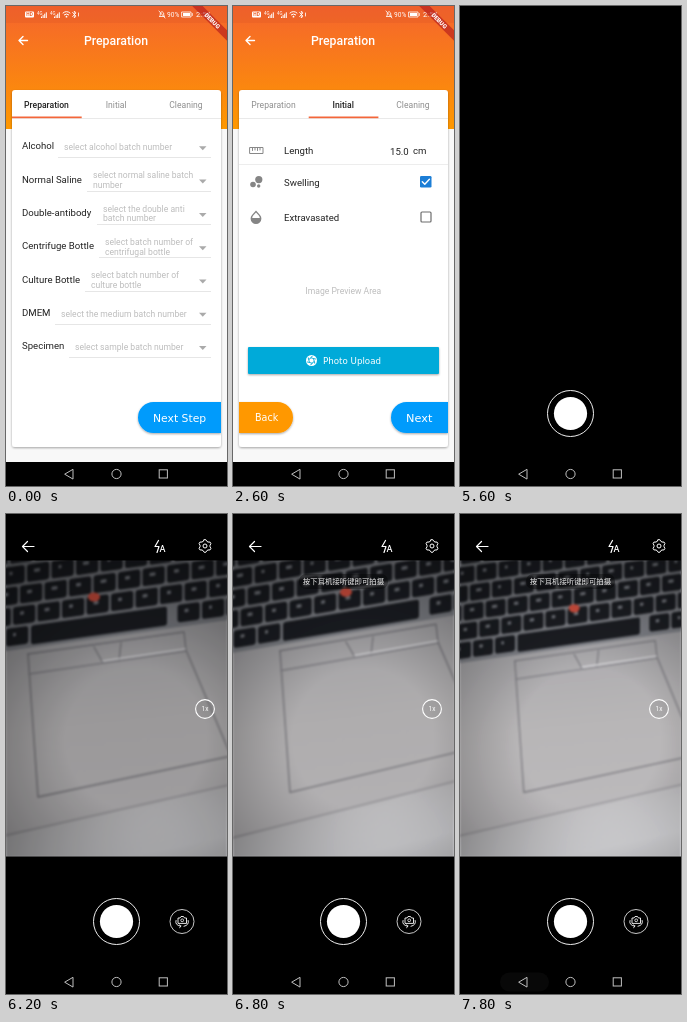
Recreate the animation shown at these times as an HTML page. Size 221 px wide and 480 px high, loop 8 s.

```html
<!DOCTYPE html>
<html lang="en">
<head>
<meta charset="utf-8">
<title>Preparation form</title>
<style>
  html, body { margin: 0; width: 100%; height: 100%; overflow: hidden; background: #000; }
  svg { display: block; width: 100vw; height: 100vh; }
  text { font-family: Roboto, sans-serif; font-size: 8.6px; }
  .label { font-size: 9.6px; fill: #222; }
  .hint { fill: #bdbdbd; }
  .script { font-family: "DejaVu Sans", sans-serif; fill: #fff; }
  .mid { text-anchor: middle; }
  .line { fill: none; stroke: #fff; stroke-linecap: round; stroke-linejoin: round; }
  .status { font-size: 6.6px; fill: #fff; }
</style>
</head>
<body>
<svg id="stage" viewBox="0 0 221 480" preserveAspectRatio="none"></svg>
<script>
const LOOP = 8000, STEP = 200;

const text = (x, y, s, cls = '', extra = '') => `<text x="${x}" y="${y}" class="${cls}" ${extra}>${s}</text>`;
const rect = (x, y, w, h, fill, extra = '') => `<rect x="${x}" y="${y}" width="${w}" height="${h}" fill="${fill}" ${extra}/>`;
const circle = (x, y, r, fill, extra = '') => `<circle cx="${x}" cy="${y}" r="${r}" fill="${fill}" ${extra}/>`;
const path = (d, fill, extra = '') => `<path d="${d}" fill="${fill}" ${extra}/>`;
const line = (d, width = 1, extra = '') => `<path d="${d}" class="line" stroke-width="${width}" ${extra}/>`;

const defs = `<defs>
  <linearGradient id="sky" x2="0" y2="1"><stop stop-color="#f5652d"/><stop offset="1" stop-color="#fe9800"/></linearGradient>
  <linearGradient id="metal" gradientUnits="userSpaceOnUse" x1="0" y1="120" x2="20" y2="320">
    <stop stop-color="#a09fa2"/><stop offset=".5" stop-color="#acaaab"/><stop offset="1" stop-color="#b0aeb0"/></linearGradient>
  <linearGradient id="desk" gradientUnits="userSpaceOnUse" x1="100" y1="298" x2="110" y2="345">
    <stop stop-color="#b2b1b3"/><stop offset="1" stop-color="#d2d2d5"/></linearGradient>
  <radialGradient id="vignette" gradientUnits="userSpaceOnUse" cx="130" cy="225" r="200">
    <stop offset=".35" stop-opacity="0"/><stop offset="1" stop-opacity=".4"/></radialGradient>
  <filter id="soft" x="-10%" y="-10%" width="120%" height="120%"><feDropShadow dx="0" dy="1" stdDeviation="1.2" flood-opacity=".35"/></filter>
  <clipPath id="card"><rect x="6" y="113" width="209" height="328"/></clipPath>
  <clipPath id="view"><rect y="46.5" width="221" height="296"/></clipPath>
</defs>`;

function statusBar() {
  const bars = x => text(x, 9, '4G', 'status', 'style="font-size:4.5px"') +
    [0, 1, 2, 3].map(i => rect(x + 4 + i * 1.6, 10.5 - i * 1.4, 1, 1.5 + i * 1.4, '#fff')).join('');
  return rect(19, 5.5, 9, 6, '#fff', 'rx="1"') +
    text(23.5, 10.4, 'HD', 'mid', 'style="font-size:4.8px" fill="#ee632d" font-weight="700"') +
    bars(31) + bars(44) +
    line('M57 7Q60.5 4 64 7M58.3 8.8Q60.5 7 62.7 8.8', 1) + circle(60.5, 10.7, .9, '#fff') +
    line('M66.5 6.5L70 10L68.3 12V5L70 7L66.5 10.5M72.5 7V10', .8) +
    line('M153.5 10.5H158.5L157.7 9V7Q156 4 154.3 7V9ZM153 5L159 12', .8) +
    text(161, 11, '90%', 'status') +
    line('M176 6H185V11H176ZM186.3 7.5V9.5', .8) + rect(177, 7, 7, 3, '#fff') +
    text(190, 11.2, '2:54', 'status', 'style="font-size:7.6px"');
}

const banner = `<g transform="translate(221 0) rotate(45)">
  ${rect(-26, 17.2, 52, 7.4, '#b71c1c', 'fill-opacity=".66"')}
  ${text(0, 23, 'DEBUG', 'mid', 'fill="#fff" style="font-size:6px" font-weight="900"')}</g>`;

function field(i, label, x, hint) {
  const y = 140.3 + i * 33.3, rows = hint.split('|');
  const first = rows.length > 1 ? y - 1.4 : y + 4;
  return text(16, y + 3, label, 'label') +
    rows.map((s, k) => text(x, first + k * 9.7, s, 'hint')).join('') +
    rect(x - 6, Math.round(y + 11), 211 - x, .7, '#dcdcdc') +
    path(`M193 ${y}h7.5l-3.75 4z`, '#aaa');
}

const firstPage = [
  ['Alcohol', 58, 'select alcohol batch number'],
  ['Normal Saline', 87, 'select normal saline batch|number'],
  ['Double-antibody', 97, 'select the double anti|batch number'],
  ['Centrifuge Bottle', 99, 'select batch number of|centrifugal bottle'],
  ['Culture Bottle', 85, 'select batch number of|culture bottle'],
  ['DMEM', 55, 'select the medium batch number'],
  ['Specimen', 69, 'select sample batch number']
].map((f, i) => field(i, ...f)).join('') +
  path('M215 396H147.5a15.5 15.5 0 0 0 0 31H215z', '#069bfc', 'filter="url(#soft)"') +
  path('M215 396H147.5a15.5 15.5 0 0 0 0 31H215z', '#fff', 'id="nextInk"') +
  text(147, 415.5, 'Next Step', 'script', 'style="font-size:10.8px"');

const aperture = [0, 60, 120, 180, 240, 300].map(a =>
  line('M78.5 352L82.5 353', .9, `style="stroke:#00aad9" transform="rotate(${a} 78.5 354.5)"`)).join('');

const secondPage =
  line('M17 141.5H30V147.5H17ZM19.5 142V144.5M22 142V144M24.5 142V144.5M27 142V144', 1, 'style="stroke:#888"') +
  text(51, 148, 'Length', 'label') +
  text(157, 149, '15.0', 'label') + text(180, 148, 'cm', 'label') +
  rect(6, 158, 209, .7, '#e6e6e6') +
  circle(20, 178.5, 2.8, '#858585') + circle(25.8, 173.6, 3.6, '#858585') + circle(25.7, 180, 1.7, '#858585') +
  text(51, 179.5, 'Swelling', 'label') +
  rect(187, 170, 11.5, 11.5, '#1c7ed6', 'rx="1.3"') + line('M189.3 175.8L191.8 178.3L196.4 173.3', 1.4) +
  path('M23 204.5L27 209a5.4 5.4 0 1 1-8 0z', '#858585') + path('M19.2 212h7.6q0-1.4-1-2.5l-2.8-3-2.8 3q-1 1.1-1 2.5', '#fff') +
  text(51, 214.5, 'Extravasated', 'label') +
  rect(188, 206, 10, 10, 'none', 'rx="1" stroke="#6d6d6d" stroke-width="1.2"') +
  text(110.3, 287.5, 'Image Preview Area', 'hint mid') +
  rect(15, 341, 191, 27, '#00aad9', 'rx="1" filter="url(#soft)"') +
  rect(15, 341, 191, 27, '#fff', 'rx="1" id="uploadInk"') +
  circle(78.5, 354.5, 5.5, '#fff') + aperture +
  text(90, 357.5, 'Photo Upload', 'script', 'style="font-size:8.7px"') +
  path('M6 396H44.5a15.5 15.5 0 0 1 0 31H6z', '#ff9800', 'filter="url(#soft)"') +
  text(22, 415, 'Back', 'script', 'style="font-size:9.6px"') +
  path('M215 396H173.5a15.5 15.5 0 0 0 0 31H215z', '#069bfc', 'filter="url(#soft)"') +
  text(173, 415.5, 'Next', 'script', 'style="font-size:11.3px"');

const form = `<g id="form">
  ${rect(0, 0, 221, 456, '#f8f8f8')}${rect(0, 0, 221, 123, 'url(#sky)')}
  ${rect(0, 0, 221, 17, '#c33d25', 'opacity=".15"')}${statusBar()}
  ${line('M21.5 34.5H13M17 30.5L13 34.5L17 38.5', 1.4)}
  ${text(110, 39, 'Preparation', 'mid', 'fill="#fff" font-weight="500" style="font-size:12.3px"')}
  ${rect(6, 84, 209, 357, '#fff', 'rx="3" filter="url(#soft)"')}
  ${['Preparation', 'Initial', 'Cleaning'].map((s, i) => text(40.5 + i * 69.7, 102, s, 'mid tab')).join('')}
  ${rect(6, 112, 209, .8, '#e4e4e4')}
  ${rect(6, 110.5, 69.7, 1.7, '#f4663a', 'id="marker"')}
  <g clip-path="url(#card)"><g id="page1">${firstPage}</g><g id="page2">${secondPage}</g></g>
  ${banner}</g>`;

// Laptop as seen by the camera; the keyboard is drawn on a skewed grid.
function keyboard() {
  let out = rect(-300, -120, 700, 257, '#7c7e84');
  for (let row = 0; row < 9; row++) {
    for (let col = -6; col < 13; col++) {
      const x = col * 24.5 + (row ? row * 7 % 24 : 0), y = 115 - row * 20.5;
      if (!row && col >= 1 && col < 7) continue;
      out += rect(x, y, 22.3, 17.6, '#1b1d22', 'rx="3"') +
        rect(x + 7, y + 5, 3 + (col * col + row) % 4, 3.5, '#b0b4bc', 'rx="1" opacity=".6"');
    }
  }
  return `<g transform="matrix(1 -.14 0 1 0 0)">${out}${rect(25, 115, 136, 19, '#1b1d22', 'rx="2.5"')}</g>`;
}

const laptop = rect(-300, -100, 800, 700, 'url(#metal)') + keyboard() +
  path('M-300 390L400 232V600H-300z', 'url(#desk)') +
  line('M-300 389L400 231', 2, 'style="stroke:#8d8c91" opacity=".7"') +
  `<g opacity=".75">` +
  line('M22 140L32 283L225 242L180 136', 1.8, 'style="stroke:#737277"') +
  line('M22 140L178 118L180 136M88 133L97 149M115 129L113 147', 1.4, 'style="stroke:#6a696f"') +
  line('M23 160L180 137', 1.6, 'style="stroke:#75747a"') +
  line('M97 147L179 135', 1.6, 'style="stroke:#dcdcdf"') + '</g>' +
  '<ellipse cx="88" cy="83" rx="6" ry="4.6" fill="#d6503f"/>';

const gear = line([...Array(24)].map((_, i) => {
  const a = (i - .5) * Math.PI / 12, r = i % 4 < 2 ? 6.4 : 5;
  return (i ? 'L' : 'M') + (199 + r * Math.sin(a)).toFixed(1) + ' ' + (32 - r * Math.cos(a)).toFixed(1);
}).join('') + 'Z', 1) + circle(199, 32, 2, 'none', 'stroke="#fff"');

const camera = `<g id="camera">${rect(0, 0, 221, 480, '#000')}
  <g clip-path="url(#view)"><g id="lens"><g id="laptop">${laptop}</g>${rect(0, 46, 221, 297, 'url(#vignette)')}</g></g>
  <g id="controls">
    ${line('M28 32.5H16.5M21.5 27.5L16.5 32.5L21.5 37.5', 1.2)}
    ${line('M152.5 26.5L149 32.5H153L151 38.5', 1.2)}
    ${text(153.5, 38, 'A', '', 'fill="#fff" font-weight="500" style="font-size:9px"')}
    ${gear}
    ${circle(199, 195, 9.4, '#777', 'fill-opacity=".2" stroke="#fff" stroke-width="1.1"')}
    ${text(199, 197.3, '1x', 'mid', 'fill="#fff" style="font-size:6.5px"')}
    ${circle(176, 407.5, 12, 'none', 'stroke="#ddd" stroke-width=".9"')}
    ${line('M172 409V404H174L175 402.5H177.5L178.5 404H180.5V409Z', .9)}
    ${circle(176.2, 406.3, 1.4, 'none', 'stroke="#fff" stroke-width=".8"')}
    ${line('M170 406.5Q168.5 411 175 412.3L173.6 411M175 412.3L173.6 413.6M182.2 406.5Q183.5 411 178 412.3', .9)}
  </g>
  <g id="shutter">${circle(110.5, 407.5, 23, 'none', 'stroke="#eee"')}${circle(110.5, 407.5, 16.6, '#fff')}</g>
  <g id="toast">${rect(66, 60, 89, 15, '#000', 'rx="7" opacity=".35"')}
    ${text(110.5, 70.3, '按下耳机接听键即可拍摄', 'mid', 'fill="#eee" style="font:7.4px \'Noto Sans CJK SC\',\'Noto Sans CJK\',sans-serif"')}</g>
</g>`;

const nav = rect(0, 456, 221, 24, '#000') +
  rect(40, 458.5, 49, 19, '#fff', 'rx="9.5" id="navInk"') +
  circle(69, 468, 6.3, '#c4c4c8', 'id="touch" opacity=".8"') +
  line('M59 468L67 463.3V472.7Z', 1, 'style="stroke:#c0c0c0"') +
  circle(110.5, 468, 4.6, 'none', 'stroke="#c0c0c0"') +
  rect(153.2, 463.8, 8.2, 8.2, 'none', 'stroke="#c0c0c0"');

const stage = document.getElementById('stage');
stage.innerHTML = defs + form + camera + nav;
const el = id => document.getElementById(id);
const tabs = [...stage.querySelectorAll('.tab')];

const show = (id, on) => { el(id).style.display = on ? '' : 'none'; };
const ease = p => 1 - (1 - p) ** 3;

// Piecewise linear value from rows of [time, ...values].
function track(rows, t) {
  if (t <= rows[0][0]) return rows[0].slice(1);
  const i = rows.findIndex(r => r[0] > t);
  if (i < 0) return rows[rows.length - 1].slice(1);
  const a = rows[i - 1], b = rows[i], p = (t - a[0]) / (b[0] - a[0]);
  return a.slice(1).map((v, k) => v + (b[k + 1] - v) * p);
}

// time, scale x, slant, scale y, shift x, shift y, brightness
const poses = [
  [5800, 1, 0, 1, 0, 0, .35], [6200, 1, 0, 1, 0, 0, .9], [6400, 1, 0, 1, 0, 0, .94],
  [7200, 1, -.06, .985, 50, -3, 1.1], [7800, .9, 0, .92, 35, 18, 1.07]
];
const nextPress = [[0, 0], [200, .18], [400, .18], [800, 0]];
const uploadPress = [[3600, 0], [4000, .14], [4400, 0]];
const backPress = [[7200, 0], [7400, .1], [7800, .03]];

function draw(t) {
  const slide = ease(Math.min(1, Math.max(0, (t - 200) / 800)));
  el('page1').setAttribute('transform', `translate(${-209 * slide} 0)`);
  el('page2').setAttribute('transform', `translate(${209 * (1 - slide)} 0)`);
  show('page1', slide < 1);
  show('page2', slide > 0);
  el('marker').setAttribute('x', 6 + 69.7 * slide);
  const active = slide < .5 ? 0 : 1;
  tabs.forEach((tab, i) => {
    tab.setAttribute('fill', i === active ? '#222' : '#8e8e8e');
    tab.setAttribute('font-weight', i === active ? 500 : 400);
  });
  el('nextInk').setAttribute('opacity', track(nextPress, t)[0]);
  el('uploadInk').setAttribute('opacity', track(uploadPress, t)[0]);
  el('navInk').setAttribute('opacity', track(backPress, t)[0]);

  show('form', t < 4600);
  show('camera', t >= 4600);
  show('shutter', t >= 5600);
  show('controls', t >= 5800);
  show('lens', t >= 6000);
  show('toast', t >= 6800);
  show('touch', t === 7200);

  const [sx, slant, sy, x, y, light] = track(poses, t);
  el('laptop').setAttribute('transform', `matrix(${sx} ${slant} 0 ${sy} ${x} ${y})`);
  el('lens').style.filter = `blur(.8px) brightness(${light})`;
}

const start = performance.now();
let last = -1;
function tick() {
  const t = Math.floor((performance.now() - start) % LOOP / STEP) * STEP;
  if (t !== last) draw(last = t);
  requestAnimationFrame(tick);
}
tick();
</script>
</body>
</html>
```
